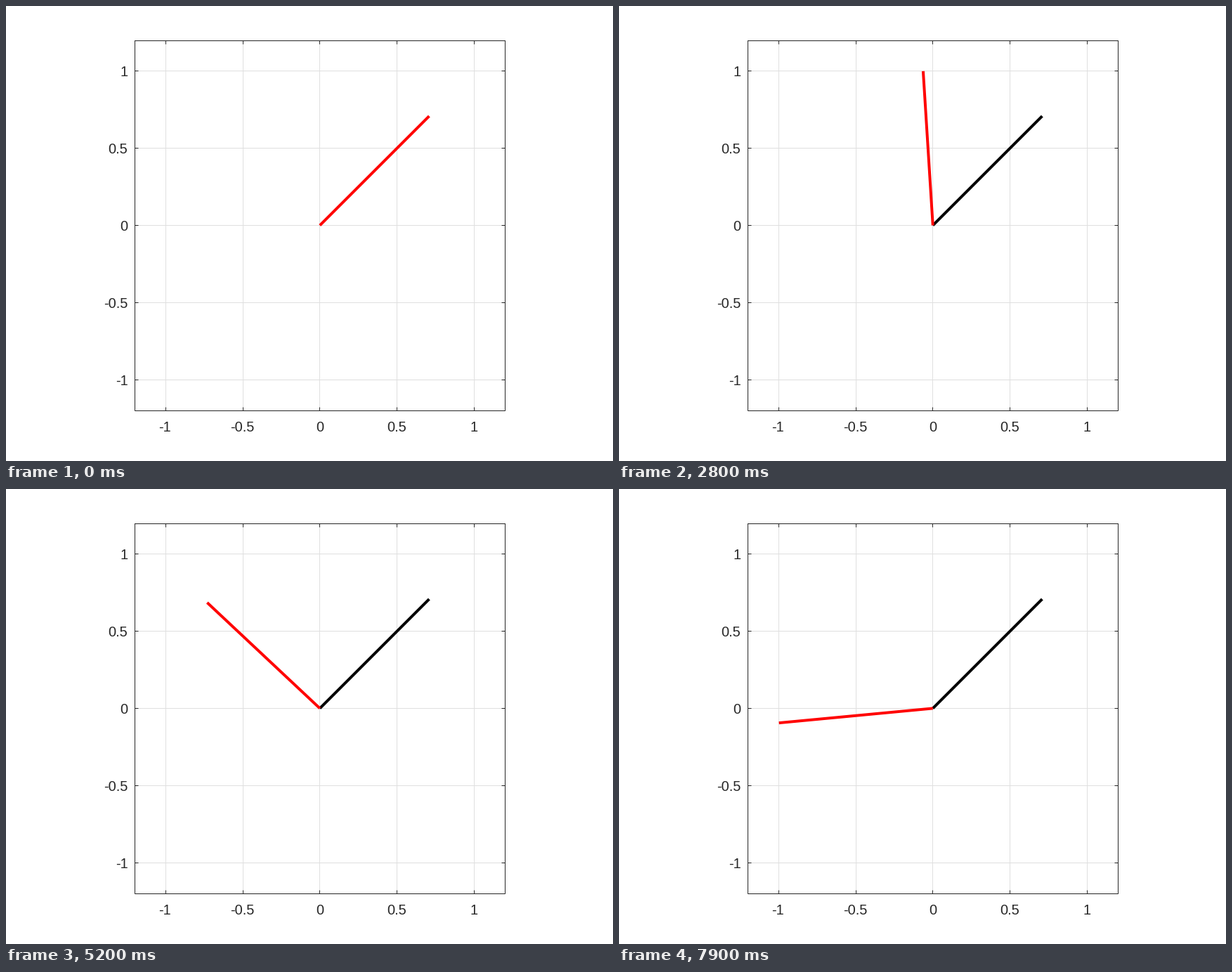
Write a matplotlib script that moves like this. It is 864 px wide and 648 px high and loops after 8000 ms.

```python
import numpy as np
import matplotlib.pyplot as plt
from matplotlib.animation import FuncAnimation

WIDTH, HEIGHT, DPI = 864, 648, 72  # at 72 dpi one point is one pixel
FRAMES, INTERVAL = 80, 100

LEFT, RIGHT, TOP, BOTTOM = 183.5, 710.5, 49.5, 576.5
X_TICKS = np.array([227, 337, 446, 556, 666]) + 0.5
Y_TICKS = np.array([532, 422, 312, 202, 92]) + 0.5
VALUES = [-1, -0.5, 0, 0.5, 1]
TICK = 5
INK, GRID = "#262626", "#dfdfdf"

ORIGIN = np.array([446.75, 312.4])
UNIT = 220.05
START_ANGLE, STEP = np.pi / 4, np.pi / 100

plt.rcParams["font.family"] = "Liberation Sans"
fig = plt.figure(figsize=(WIDTH / DPI, HEIGHT / DPI), dpi=DPI, facecolor="white")
ax = fig.add_axes([0, 0, 1, 1])
ax.set_xlim(0, WIDTH)
ax.set_ylim(HEIGHT, 0)
ax.axis("off")


def stroke(xs, ys, color, width=1, z=1):
    line, = ax.plot(xs, ys, color=color, lw=width, zorder=z, snap=False,
                    solid_capstyle="butt", solid_joinstyle="miter")
    return line


def label(x, baseline, value, align):
    ax.text(x, baseline, f"{value:g}", size=20, color=INK,
            ha=align, va="baseline")


def draw_axes():
    for x, value in zip(X_TICKS, VALUES):
        stroke([x, x], [TOP, BOTTOM], GRID)
        stroke([x, x], [TOP, TOP + TICK], INK, z=2)
        stroke([x, x], [BOTTOM, BOTTOM - TICK], INK, z=2)
        label(446.5 + 220 * value, 606, value, "center")
    for y, value in zip(Y_TICKS, VALUES):
        stroke([LEFT, RIGHT], [y, y], GRID)
        stroke([LEFT, LEFT + TICK], [y, y], INK, z=2)
        stroke([RIGHT, RIGHT - TICK], [y, y], INK, z=2)
        label(173.5, y + 7.5, value, "right")
    stroke([LEFT, RIGHT, RIGHT, LEFT, LEFT, RIGHT],
           [TOP, TOP, BOTTOM, BOTTOM, TOP, TOP], INK, z=3)


def arm(angle):
    tip = ORIGIN + UNIT * np.array([np.cos(angle), -np.sin(angle)])
    return [ORIGIN[0], tip[0]], [ORIGIN[1], tip[1]]


draw_axes()
fixed_arm = stroke(*arm(START_ANGLE), "black", 4, 4)
moving_arm = stroke(*arm(START_ANGLE), "red", 4, 5)


def update(frame):
    # The rotation pauses for one frame after its first step.
    step = frame if frame < 2 else frame - 1
    fixed_arm.set_visible(frame > 0)
    moving_arm.set_data(*arm(START_ANGLE + step * STEP))
    return fixed_arm, moving_arm


anim = FuncAnimation(fig, update, frames=FRAMES, interval=INTERVAL,
                     repeat=True, repeat_delay=0)
plt.show()
```
